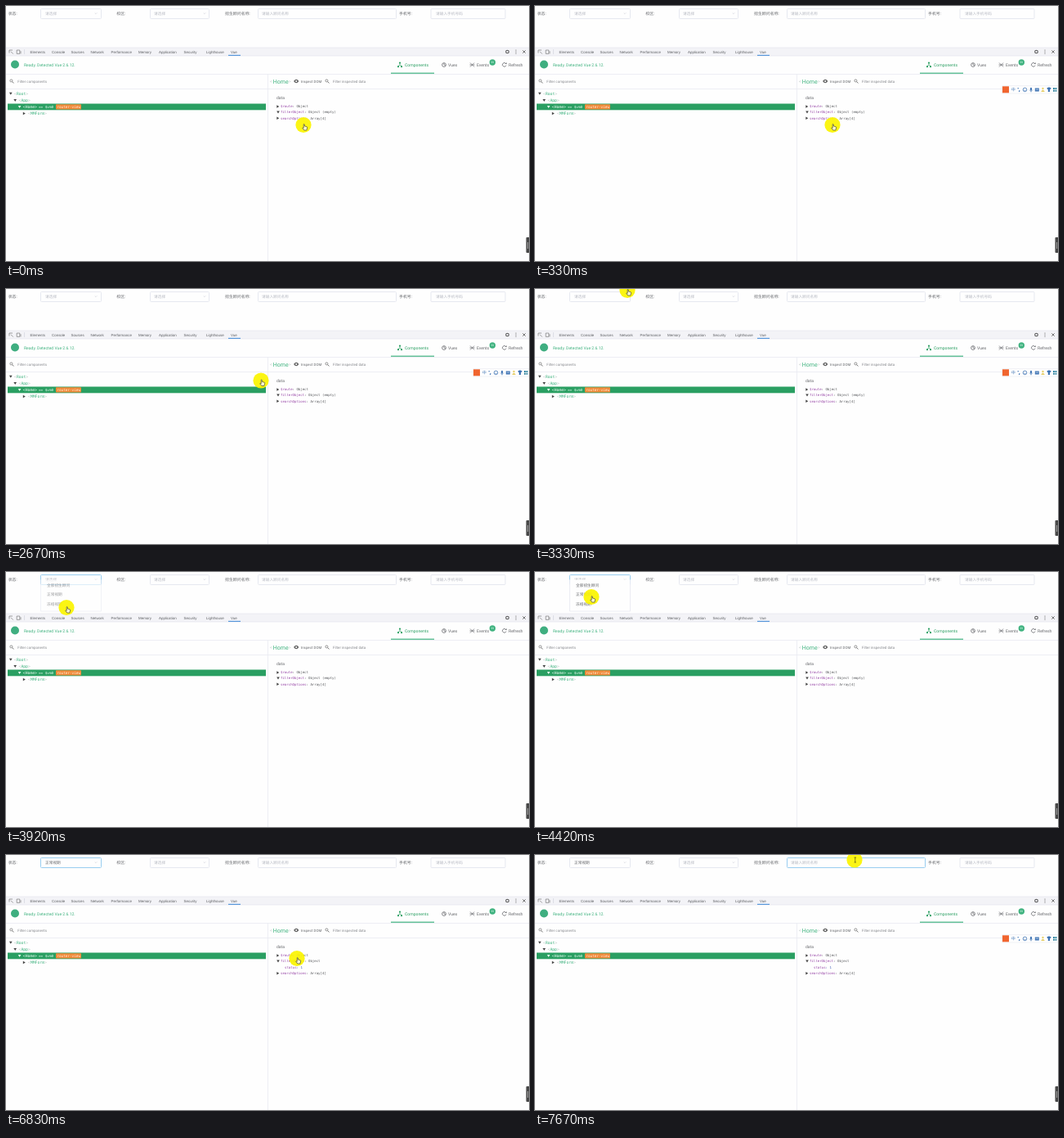
Recreate the animation shown at these times as an HTML page. Size 640 by 312 pixels, loop 8000 ms.

```html
<!DOCTYPE html>
<html>
<head>
<meta charset="utf-8">
<title>Filter form and devtools</title>
<style>
  html, body { margin: 0; width: 100%; height: 100%; overflow: hidden; background: #fefefe; }
  svg { display: block; width: 100vw; height: 100vh; }
  text { font-family: Roboto, "Noto Sans CJK SC", "Noto Sans CJK", sans-serif; text-rendering: geometricPrecision; white-space: pre; }
  .mono { font-family: "DejaVu Sans Mono", monospace; }
  .tool { font-family: "Liberation Sans", sans-serif; }
</style>
</head>
<body>
<svg id="stage" viewBox="0 0 640 312"></svg>
<script>
const stage = document.getElementById('stage');
const ink = '#66686c', pale = '#b6b9c2', edge = '#e6e8f0', rule = '#e9eaf1', focus = '#98cdf0';
const green = '#2a9f62', leaf = '#3fb27f', faint = '#b9c4c0', key = '#9440a4';

function add(tag, attrs, parent = stage) {
  const el = document.createElementNS('http://www.w3.org/2000/svg', tag);
  for (const name in attrs) el.setAttribute(name, attrs[name]);
  return parent.appendChild(el);
}
const group = (id) => add('g', { id });
const rect = (x, y, width, height, fill, parent, more) =>
  add('rect', { x, y, width, height, fill, ...more }, parent);
const circle = (cx, cy, r, fill, parent, more) =>
  add('circle', { cx, cy, r, fill, ...more }, parent);
const line = (d, stroke, width = 0.8, parent) =>
  add('path', { d, stroke, 'stroke-width': width, fill: 'none' }, parent);
const shape = (d, fill, parent) => add('path', { d, fill }, parent);

// y is the vertical middle of the line
function label(x, y, words, size, fill, parent, more) {
  const el = add('text', { x, y: y + size * 0.36, 'font-size': size, fill, ...more }, parent);
  el.textContent = words;
  return el;
}
const mono = (x, y, words, size, fill, parent) =>
  label(x, y, words, size, fill, parent, { class: 'mono' });
const arrowDown = (x, y, fill = '#444') =>
  shape(`M${x - 1.8} ${y - 1.4}h3.6l-1.8 3z`, fill);
const arrowRight = (x, y, parent) =>
  shape(`M${x - 1.2} ${y - 1.8}v3.6l3 -1.8z`, '#444', parent);

function search(x, y) {
  circle(x - 0.6, y - 0.6, 1.5, 'none', stage, { stroke: '#555', 'stroke-width': 0.6 });
  line(`M${x + 0.5} ${y + 0.5}l1.9 1.9`, '#555', 0.8);
}

// Filter form
function field(x, width) {
  return rect(x + 0.5, 3.5, width, 12, '#fefefe', stage, { stroke: edge, rx: 1 });
}
const statusBox = field(42, 74);
field(176, 72);
const nameBox = field(308, 169);
field(519.5, 91);
label(2.7, 9, '状态:', 4.95, ink);
label(135.3, 9, '校区:', 4.95, ink);
label(268, 9, '招生顾问名称:', 4.95, ink);
label(481, 9, '手机号:', 4.95, ink);
const statusValue = label(48, 9, '', 4.7, pale);
label(181, 9, '请选择', 4.7, pale);
label(313, 9, '请输入顾问名称', 4.7, pale);
label(526, 9, '请输入手机号码', 4.7, pale);
for (const x of [110, 243]) line(`M${x - 1.3} 8.4l1.3 1.3l1.3 -1.3`, '#c9ccd4', 0.6);

// Devtools toolbar
rect(0, 51, 640, 10, '#f3f3f7');
line('M0 51H640M0 61H640', '#dfe0ea', 0.6);
line('M4 57.5v-3.5h4M6 55.8l2.8 2.8', '#666', 0.6);
line('M13.2 54h3.6v4.4h-3.6zM18 55.2v3.2', '#666', 0.6);
line('M22.5 53v6', '#cfd0da', 0.6);
const tabs = { Elements: 29.5, Console: 56, Sources: 79.5, Network: 103.5, Performance: 128.5,
  Memory: 162, Application: 187, Security: 217.5, Lighthouse: 245, Vue: 275 };
for (const name in tabs) label(tabs[name], 56, name, 4.45, '#5c5e62', stage, { class: 'tool' });
rect(272, 59.8, 15, 1.1, '#4a90d9');
circle(613.5, 56, 1.8, 'none', stage, { stroke: '#555', 'stroke-width': 1.1 });
for (const y of [54, 56, 58]) circle(624, y, 0.55, '#555');
line('M632.3 54.3l3.4 3.4M635.7 54.3l-3.4 3.4', '#555', 0.8);

// Panel header
circle(11, 71.5, 5, '#3fae80');
label(22, 72, 'Ready. Detected Vue 2.6.12.', 5.05, leaf);
line('M482 71V69M482 71.5l-2 2.5M482 71.5l2 2.5', green, 0.8);
for (const [x, y] of [[482, 69.5], [480, 74.2], [484, 74.2]]) circle(x, y, 1.1, green);
label(488, 72, 'Components', 5.1, green);
rect(471, 81.6, 53, 1.2, leaf);
circle(536, 72, 2.4, 'none', stage, { stroke: ink, 'stroke-width': 0.8 });
line('M536 72v-2M536 72l2 1', ink, 0.7);
label(541, 72, 'Vuex', 5.1, ink);
line('M568 69.5l5 5M573 69.5l-5 5M567.5 72h6', ink, 0.7);
label(576, 72, 'Events', 5.1, ink);
circle(595.3, 69, 3.7, leaf);
label(595.3, 69, '99', 3.3, '#e9fff4', stage, { 'text-anchor': 'middle' });
line('M611.6 70.4a2.3 2.3 0 1 0 .4 2.2', ink, 0.8);
shape('M610.6 70.9h2v-2z', ink);
label(615, 72, 'Refresh', 5.1, ink);
line('M0 83.5H640M0 101.5H640M320.5 83V312', rule);

// Search rows
search(7, 92);
label(14.3, 92, 'Filter components', 4.45, '#85878c');
label(323, 92, '<', 5, faint);
label(326.8, 92, 'Home', 7, leaf);
label(346, 92, '>', 5, faint);
shape('M352 92q3.2 -4.4 6.4 0q-3.2 4.4 -6.4 0z', '#666');
circle(355.2, 92, 1, '#fefefe');
label(361, 92, 'Inspect DOM', 4.4, ink);
search(393, 92);
label(400, 92, 'Filter inspected data', 4.45, '#85878c');

// Component tree
function node(x, y, name) {
  const el = mono(x, y, '', 4.75, faint);
  [['<'], [name, leaf], ['>']].forEach(([part, fill = faint]) => {
    add('tspan', { fill }, el).textContent = part;
  });
}
rect(2, 119.5, 316, 7.8, green);
arrowDown(5.8, 107.2);
node(10, 107.2, 'Root');
arrowDown(11.2, 115.3);
node(15.5, 115.3, 'App');
arrowDown(16.6, 123.3, '#e4fff0');
mono(20.8, 123.3, '<Home>', 4.75, '#f4fff9');
mono(40, 123.3, '== $vm0', 4.3, '#f4fff9');
rect(61, 120.2, 31, 6.3, '#f08a3a', stage, { rx: 0.8 });
mono(62.3, 123.2, 'router-view', 4.35, '#fff0dc');
arrowRight(22, 131.5);
node(27, 131.5, 'MMForm');

// Inspected data
label(331, 112, 'data', 5, ink);
function entry(x, y, name, value, parent, valueFill = '#55565a') {
  const el = mono(x, y, '', 4.04, valueFill, parent);
  add('tspan', { fill: key }, el).textContent = name;
  const rest = add('tspan', {}, el);
  rest.textContent = ': ' + value;
  return rest;
}
arrowRight(332.5, 123);
entry(336, 123, '$route', 'Object');
arrowDown(333, 130);
const filterValue = entry(336, 130, 'filterObject', '');
const statusEntry = group('statusEntry');
entry(341, 137.3, 'status', '1', statusEntry, '#3f5fb8');
const options = group('options');
arrowRight(332.5, 137.3, options);
entry(336, 137.3, 'searchOptions', 'Array[4]', options);

// Side handle
rect(636.5, 283, 4, 19, '#484848', stage, { rx: 1 });
line('M638.6 289v8', '#b4b4b4', 0.9);

// Status choices
const menu = group('menu');
rect(42.5, 9.5, 74, 38.5, '#fefefe', menu);
line('M42.5 9.5V48H116.5V9.5', edge, 0.8, menu);
['全部招生顾问', '正常视期', '冻结视期'].forEach((words, i) =>
  label(50, 16.3 + i * 11.5, words, 4.7, ink, menu));

// Input method bar
const ime = group('ime');
rect(572, 97.8, 69, 9.2, '#fefefe', ime, { stroke: rule, 'stroke-width': 0.7 });
rect(572, 98.3, 8, 8, '#f0652f', ime);
const blue = '#3f74b4';
label(582.7, 102.4, '中', 5, blue, ime);
line('M590.5 100.8h1.5M593 103.2l-.6 1.8', blue, 1.1, ime);
circle(599.5, 102.4, 2.3, 'none', ime, { stroke: blue, 'stroke-width': 0.8 });
line('M598.3 103q1.2 1.2 2.4 0', blue, 0.6, ime);
rect(606, 99.8, 2, 3.6, blue, ime, { rx: 1 });
line('M605 102.5q2 3.4 4 0M607 104v1.4', blue, 0.6, ime);
rect(611.8, 100.5, 5, 4, blue, ime);
line('M612.6 102.2h3.4', '#fff', 0.6, ime);
circle(621.5, 101, 1.2, '#e6cf6a', ime);
shape('M619.2 105q2.3 -4.5 4.6 0z', '#e6cf6a', ime);
shape('M626.4 100.4l1.6 -.8h2l1.6 .8l-.8 1.5h-.8v3.2h-2.2v-3.2h-.8z', blue, ime);
for (const [x, y] of [[634, 100], [636.5, 100], [634, 102.7], [636.5, 102.7]])
  rect(x, y, 1.9, 2, '#2f84a0', ime);

// Pointer, drawn around the middle of its halo
const halo = circle(0, 0, 9.6, '#fbf400', stage, { opacity: 0.92 });
const hand = add('path', {
  d: 'M.2 -.8q.7 -.6 1.1 .2v2.1l2.8 .7q.8 .3 .5 1.3l-.7 3h-3.1l-2.1 -2.8q.1 -.9 1.5 .2z',
  fill: '#fffbd0', stroke: '#4a4a30', 'stroke-width': 0.7 });
const beam = line('M-.4 -3h2.4M.8 -3v6M-.4 3h2.4', '#55551a', 0.7);

// Pointer stops: tick, x, y (twelve ticks a second)
const path = [
  [0, 364, 145.5], [30, 364, 145.5], [31, 355, 141.5], [32, 312, 112], [34, 285, 88],
  [35, 253, 64], [36, 253, 64], [37, 218, 45], [38, 181, 25], [40, 113, 1.5],
  [44, 88, 8], [46, 76, 25], [48, 72, 62], [50, 70, 49], [53, 69, 30.5],
  [56, 69, 30], [65, 69, 30], [68, 85, 44], [70, 160, 100], [71, 202, 124.5],
  [72, 285, 165], [73, 340, 178], [74, 372, 156], [76, 355, 148], [78, 330, 138],
  [80, 355, 140], [82, 356, 126.5], [83, 380, 70], [84, 403, 8], [85, 403, 8], [86, 391, 6]
];
function pointerAt(tick) {
  const next = path.findIndex(stop => stop[0] > tick);
  if (next < 0) return path[path.length - 1].slice(1);
  const [t0, x0, y0] = path[next - 1], [t1, x1, y1] = path[next];
  const part = (tick - t0) / (t1 - t0);
  return [x0 + (x1 - x0) * part, y0 + (y1 - y0) * part];
}
const ramp = (tick, from, to) => Math.min(1, Math.max(0, (tick - from) / (to - from)));
const show = (el, opacity) => el.setAttribute('opacity', opacity);

function draw(time) {
  let tick = Math.floor((time % 8000 + 4) / (1000 / 12));
  if (tick % 6 === 3) tick--;

  const place = `translate(${pointerAt(tick).join(' ')})`;
  for (const el of [halo, hand, beam]) el.setAttribute('transform', place);
  show(hand, tick < 84 ? 1 : 0);
  show(beam, tick < 84 ? 0 : 1);

  const chosen = tick >= 66, typing = tick >= 89;
  show(ime, tick < 41 ? ramp(tick, 0, 4) : ramp(tick, 87, 90));
  show(menu, ramp(tick, 45, 48) * (1 - ramp(tick, 65, 68)));
  statusBox.setAttribute('stroke', tick >= 42 && !typing ? focus : edge);
  nameBox.setAttribute('stroke', typing ? focus : edge);
  statusValue.textContent = chosen ? '正常视期' : '请选择';
  statusValue.setAttribute('fill', chosen ? ink : pale);
  filterValue.textContent = chosen ? ': Object' : ': Object (empty)';
  show(statusEntry, chosen ? 1 : 0);
  options.setAttribute('transform', `translate(0 ${chosen ? 7.5 : 0})`);
}

const start = performance.now();
function loop() {
  draw(performance.now() - start);
  requestAnimationFrame(loop);
}
loop();
</script>
</body>
</html>
```
